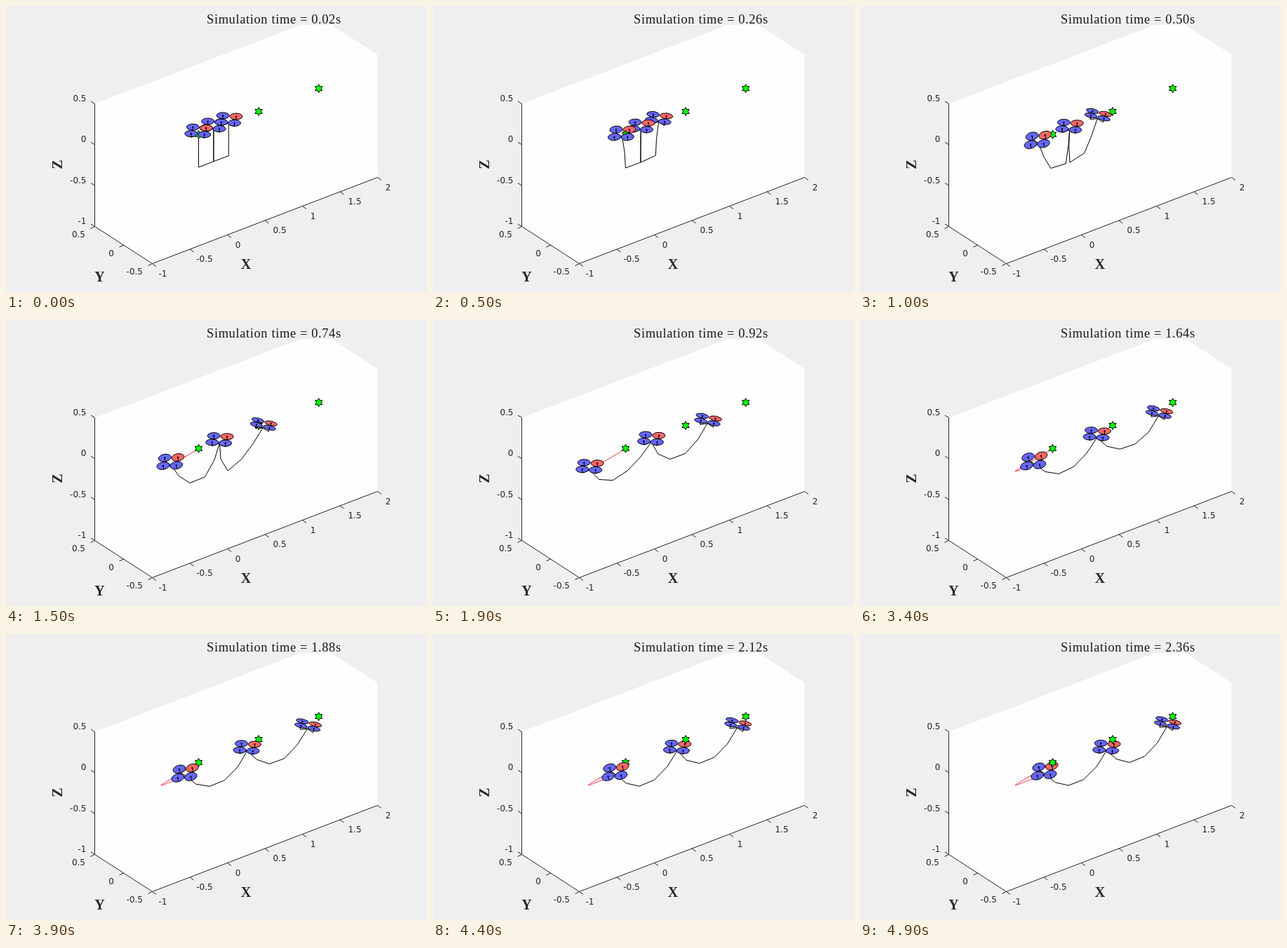
Write an HTML page with a canvas that moves like this. It is 600 px wide and 408 px high and loops after 5 s.

```html
<!DOCTYPE html>
<html lang="en">
<head>
<meta charset="utf-8">
<title>Three tethered drones</title>
<style>
  html, body { margin: 0; width: 100%; height: 100%; overflow: hidden; background: #efeef0; }
  canvas { display: block; width: 600px; height: 408px; }
</style>
</head>
<body>
<canvas id="stage" width="600" height="408"></canvas>
<script>
const ctx = document.getElementById('stage').getContext('2d');
const LOOP = 5000, STEP = 100, STEPS = LOOP / STEP;
const ARM = 0.1, MAST = 0.045, BLADE = 0.067;
const LINK = 0.2, LINKS = 5, SUBSTEPS = 20, DT = 0.048 / SUBSTEPS;
const INK = '#262626';

const ease = s => {
  s = Math.min(Math.max(s, 0), 1);
  return s * s * (3 - 2 * s);
};
const bump = s => Math.exp(-s * s);
const hill = (k, mid, power) => k > 0 ? 1 / (1 + (mid / k) ** power) : 0;
// Steady lean against the rope, released around the step where the drone brakes
const lean = (k, brake) => .27 * (ease(k / 12) - bump((k - brake) / 5.5));

// Each drone: step -> position and pitch in the plane y = 0
const droneA = k => ({
  x: k < 21.5 ? -.5 * ease((k / 21.5) ** 1.15) : -.5 * (1 - hill(k - 21.5, 11.8, 1.7)),
  z: -.107 * ease(k / 24),
  pitch: lean(k, 20.5)
});
const droneB = k => ({
  x: .2 + .62 * hill(k, 28.4, 3),
  z: -.0022 * k,
  pitch: 0
});
const droneC = k => ({
  x: .4 + .97 * ease((k / 27) ** 1.25) + .0074 * Math.max(0, k - 28.5),
  z: -.098 * ease((k - 5) / 20),
  pitch: -lean(k, 26)
});

// Hanging chain between two drones, one shape per step
function swingRope(from, to) {
  const nodes = Array.from({ length: LINKS + 1 }, (_, j) => {
    const x = (j > LINKS / 2 ? to : from)(0).x, z = -LINK * Math.min(j, LINKS - j);
    return { x, z, oldX: x, oldZ: z };
  });
  const shapes = [];
  for (let n = 0; n < STEPS * SUBSTEPS; n++) {
    if (n % SUBSTEPS === 0) shapes.push(nodes.map(p => [p.x, p.z]));
    const k = (n + 1) / SUBSTEPS;
    for (const p of nodes) {
      const vx = (p.x - p.oldX) * .995, vz = (p.z - p.oldZ) * .995;
      p.oldX = p.x;
      p.oldZ = p.z;
      p.x += vx;
      p.z += vz - 9.81 * DT * DT;
    }
    for (let pass = 0; pass < 30; pass++) {
      Object.assign(nodes[0], { x: from(k).x, z: from(k).z });
      Object.assign(nodes[LINKS], { x: to(k).x, z: to(k).z });
      for (let j = 0; j < LINKS; j++) {
        const p = nodes[j], q = nodes[j + 1];
        const wp = j === 0 ? 0 : j === LINKS - 1 ? 1 : .5;
        const dx = q.x - p.x, dz = q.z - p.z;
        const pull = 1 - LINK / Math.hypot(dx, dz);
        p.x += dx * pull * wp;
        p.z += dz * pull * wp;
        q.x -= dx * pull * (1 - wp);
        q.z -= dz * pull * (1 - wp);
      }
    }
  }
  return shapes;
}
const ropes = [swingRope(droneA, droneB), swingRope(droneB, droneC)];

const project = (x, y, z) =>
  [274.5 + 107 * x - 82 * y, 183.3 - 41 * x - 53 * y - 116.7 * z];
const nearness = (x, y, z) =>
  Math.round((-.527 * x - .687 * y + .5 * z) * 1000) / 1000;

function outline(points) {
  ctx.beginPath();
  points.forEach(p => ctx.lineTo(p[0], p[1]));
}

function trace(points, color, width = 1) {
  outline(points);
  ctx.strokeStyle = color;
  ctx.lineWidth = width;
  ctx.stroke();
}

function fillAndEdge(color) {
  ctx.fillStyle = color;
  ctx.fill();
  ctx.strokeStyle = '#000';
  ctx.lineWidth = 1;
  ctx.stroke();
}

function label(text, x, y, font, align = 'center') {
  ctx.font = font;
  ctx.textAlign = align;
  ctx.textBaseline = 'middle';
  ctx.fillStyle = INK;
  ctx.fillText(text, x, y);
}

function tickMark([x, y], dx, dy) {
  trace([[x, y], [x + dx, y + dy]], INK);
}

function drawAxes() {
  ctx.fillStyle = '#efeef0';
  ctx.fillRect(0, 0, 600, 408);

  const top = project(-1, .5, .5), left = project(-1, .5, -1);
  const front = project(-1, -.5, -1), right = project(2, -.5, -1);
  ctx.save();
  ctx.beginPath();
  ctx.rect(0, 27, 600, 381);
  ctx.clip();
  outline([top, project(2, .5, .5), project(2, -.5, .5), right, front, left]);
  ctx.fillStyle = '#fefefe';
  ctx.fill();
  ctx.restore();
  trace([top, left, front, right], INK);

  const small = '12px "DejaVu Sans", sans-serif';
  for (let v = -1; v <= 2; v += .5) {
    const p = project(v, -.5, -1);
    tickMark(p, 5.5, 4);
    label(String(v), p[0] + (v % 1 ? 21 : 15), p[1] + 15, small);
  }
  for (let v = -.5; v <= .5; v += .5) {
    const p = project(-1, v, -1);
    tickMark(p, -6, 3);
    label(String(v), p[0] - 13.5, p[1] + 12.5, small, 'right');
  }
  for (let v = -1; v <= .5; v += .5) {
    const p = project(-1, .5, v);
    tickMark(p, -5.5, -3.5);
    label(String(v), p[0] - 12, p[1] - 6.5, small, 'right');
  }

  const bold = 'bold 20px "Liberation Serif", serif';
  label('X', 342, 370, bold);
  label('Y', 133.5, 388, bold);
  ctx.save();
  ctx.translate(75, 226);
  ctx.rotate(-Math.PI / 2);
  label('Z', 0, 0, bold);
  ctx.restore();
}

function drawTitle(k) {
  const time = (Math.floor(1 + 2.4 * k + 1e-6) * .02).toFixed(2);
  ctx.letterSpacing = '0.6px';
  ctx.textBaseline = 'alphabetic';
  ctx.textAlign = 'left';
  ctx.font = '18.5px "Liberation Serif", serif';
  ctx.fillStyle = '#1a1a1a';
  ctx.fillText(`Simulation time = ${time}s`, 286, 24.5);
  ctx.letterSpacing = '0px';
}

function drawStar([x, y]) {
  ctx.beginPath();
  for (let i = 0; i < 12; i++) {
    const r = i % 2 ? 3.4 : 6, a = i * Math.PI / 6;
    ctx.lineTo(x + r * Math.sin(a), y - r * Math.cos(a));
  }
  ctx.closePath();
  fillAndEdge('#0f0');
}

function drawDisc([cx, cy], foot, pitch, color) {
  const [ox, oy] = project(0, 0, 0);
  const u = project(Math.cos(pitch), 0, Math.sin(pitch)), v = project(0, 1, 0);
  ctx.save();
  ctx.transform(u[0] - ox, u[1] - oy, v[0] - ox, v[1] - oy, cx, cy);
  ctx.beginPath();
  ctx.arc(0, 0, BLADE, 0, 2 * Math.PI);
  ctx.restore();
  fillAndEdge(color);
  trace([[cx, cy], foot], '#000');
  ctx.fillStyle = '#000';
  ctx.fillRect(cx - 1, cy - 1, 2, 2);
}

function addDrone(items, { x, z, pitch }) {
  const c = Math.cos(pitch), s = Math.sin(pitch), base = project(x, 0, z);
  const at = (bx, by, bz) => [x + bx * c - bz * s, by, z + bx * s + bz * c];
  const spots = [[0, ARM], [ARM, 0], [-ARM, 0], [0, -ARM]];
  const feet = spots.map(([bx, by]) => project(...at(bx, by, 0)));
  items.push({
    near: nearness(x, 0, z),
    draw: () => feet.forEach(f => trace([base, f], '#000'))
  });
  spots.forEach(([bx, by], i) => {
    const hub = at(bx, by, MAST);
    const color = bx > 0 ? '#fb6666' : '#6666fb';
    items.push({
      near: nearness(...hub),
      draw: () => drawDisc(project(...hub), feet[i], pitch, color)
    });
  });
}

function drawScene(k) {
  drawAxes();
  drawTitle(k);

  const path = [];
  for (let n = 0; n <= k * 4; n++) {
    const { x, z } = droneA(n / 4);
    path.push(project(x, 0, z));
  }
  trace(path, '#f00020', .9);
  ropes.forEach(shapes =>
    trace(shapes[k].map(([x, z]) => project(x, 0, z)), '#000'));

  const items = [];
  [droneB, droneA, droneC].forEach(drone => addDrone(items, drone(k)));
  [0, .8, 1.6].forEach(x => items.push({
    near: nearness(x, 0, 0),
    draw: () => drawStar(project(x, 0, 0))
  }));
  items.sort((m, n) => m.near - n.near).forEach(item => item.draw());
}

ctx.lineJoin = 'round';
const start = performance.now();
let shown = -1;
function tick() {
  const k = Math.floor((performance.now() - start) % LOOP / STEP);
  if (k !== shown) drawScene(shown = k);
  requestAnimationFrame(tick);
}
tick();
</script>
</body>
</html>
```
